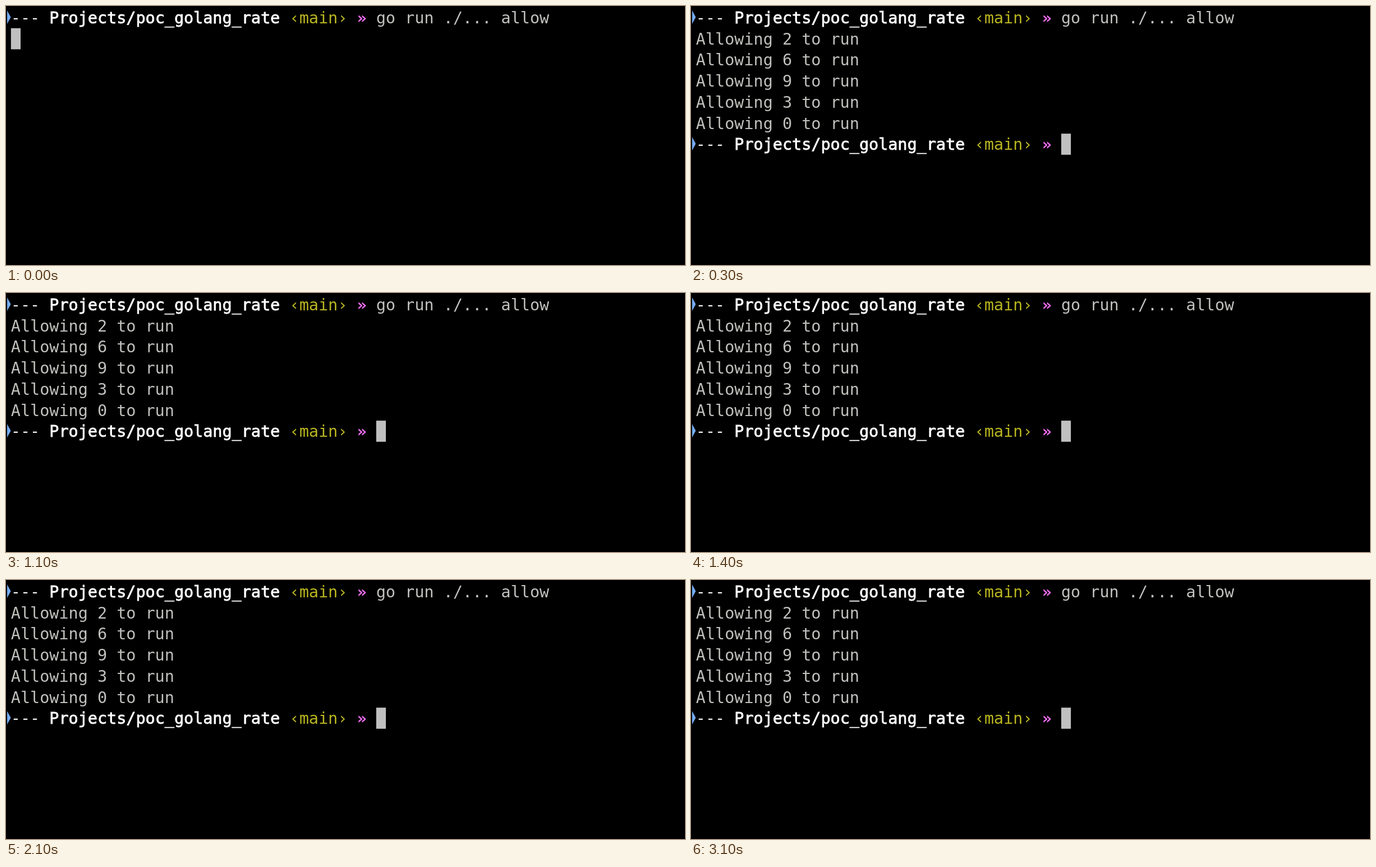
Animation of 1210 by 463 pixels, one loop 3200 ms. Source, as an HTML page:

```html
<!DOCTYPE html>
<html lang="en">
<head>
<meta charset="utf-8">
<title>Terminal</title>
<style>
  html, body { margin: 0; width: 100%; height: 100%; overflow: hidden; background: #000; }
  svg { display: block; width: 1210px; height: 463px; }
  text { font: 28.45px "DejaVu Sans Mono", monospace; white-space: pre; fill: #c1c1be; }
  .path { fill: #fff; stroke: #fff; stroke-width: .8px; }
  .dash { fill: #f4f4f4; }
  .branch { fill: #bab620; }
  .arrow { fill: #f26df3; font-weight: bold; }
  .mark { fill: #74abf5; }
  .cursor { fill: #c0c0c0; }
</style>
</head>
<body>
<svg id="screen" viewBox="0 0 1210 463"></svg>
<script>
const LOOP = 3200, OUTPUT_AT = 200, PROMPT_AT = 300;
const LEFT = 8.8, TOP = 2, COL = 17.13, ROW = 37.7;
const screen = document.getElementById("screen");

function add(parent, tag, attrs, text = "") {
  const el = document.createElementNS("http://www.w3.org/2000/svg", tag);
  for (const key in attrs) el.setAttribute(key, attrs[key]);
  el.textContent = text;
  return parent.appendChild(el);
}

const group = () => add(screen, "g", {});
const colX = col => LEFT + col * COL;
const rowY = row => TOP + row * ROW;

function write(parent, row, col, text, cls = "") {
  add(parent, "text", { x: colX(col), y: rowY(row) + 29, class: cls }, text);
}

function mark(parent, row) {
  const y = rowY(row);
  add(parent, "path", { d: `M2 ${y + 6}L8.5 ${y + 18}L2 ${y + 30}Z`, class: "mark" });
}

function prompt(parent, row) {
  write(parent, row, 0, "---", "dash");
  write(parent, row, 4, "Projects/poc_golang_rate", "path");
  write(parent, row, 29, "‹main›", "branch");
  write(parent, row, 36, "»", "arrow");
}

const command = group();
mark(command, 0);
prompt(command, 0);
write(command, 0, 38, "go run ./... allow");

const output = group();
[2, 6, 9, 3, 0].forEach((n, i) => write(output, i + 1, 0, `Allowing ${n} to run`));
mark(output, 6);

const ready = group();
prompt(ready, 6);

const cursor = add(screen, "rect", { width: 17.2, height: ROW, class: "cursor" });

function show(el, on) {
  el.setAttribute("visibility", on ? "visible" : "hidden");
}

function draw(now) {
  const t = now % LOOP;
  const done = t >= OUTPUT_AT, idle = t >= PROMPT_AT;
  show(output, done);
  show(ready, idle);
  cursor.setAttribute("x", colX(idle ? 38 : 0));
  cursor.setAttribute("y", rowY(done ? 6 : 1));
}

const start = performance.now();
function tick() {
  draw(performance.now() - start);
  requestAnimationFrame(tick);
}
tick();
</script>
</body>
</html>
```
